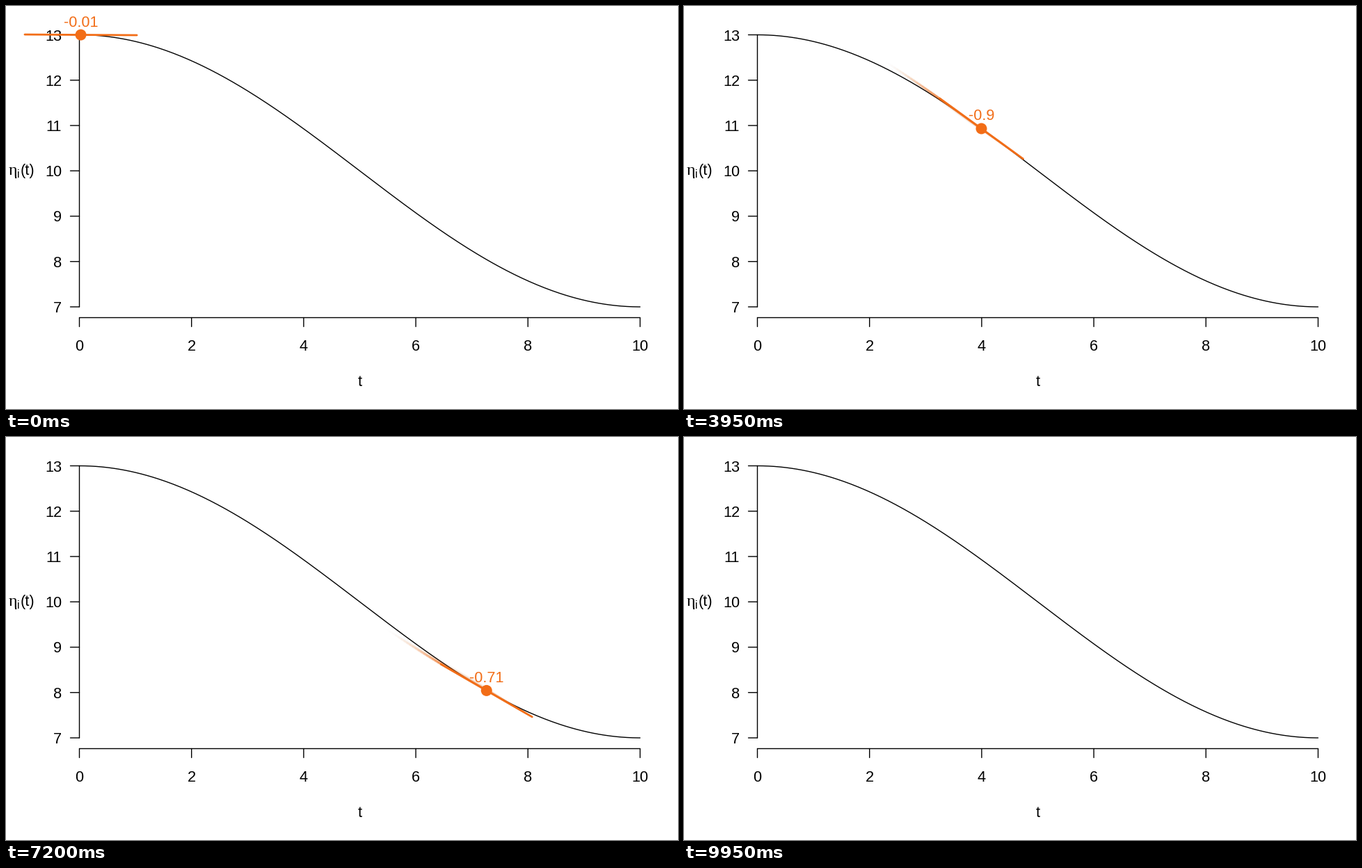
A matplotlib script for the animation above (10000 ms loop, 966x580 px).

```python
import numpy as np
import matplotlib.pyplot as plt
from matplotlib.animation import FuncAnimation
from matplotlib.collections import LineCollection
from matplotlib.colors import to_rgb
from matplotlib.patches import Circle

W, H, DPI = 966, 580, 64
PX = 72 / DPI  # points per pixel
FRAMES, INTERVAL = 200, 50
STEP = 10 / (FRAMES - 1)
WAKE = 20
ORANGE = "#f26d17"
FONT = 21.8

fig = plt.figure(figsize=(W / DPI, H / DPI), dpi=DPI, facecolor="white")
ax = fig.add_axes([0, 0, 1, 1])
ax.set_xlim(0, W)
ax.set_ylim(H, 0)
ax.axis("off")


def sx(t):
    return 105.5 + 80.6 * t


def sy(v):
    return 433 - 65.25 * (v - 7)


def eta(t):
    return 10 + 3 * np.cos(np.pi * t / 10)


def slope(t):
    return -0.3 * np.pi * np.sin(np.pi * t / 10)


def line(x, y):
    ax.plot(x, y, color="black", lw=1.4 * PX, solid_capstyle="round",
            snap=False, zorder=1)


def label(x, y, s, ha="center", size=FONT, font="Liberation Sans", **kw):
    return ax.text(x, y, s, ha=ha, va="baseline", fontsize=size * PX,
                   fontfamily=font, **kw)


def segment(t, m):
    """Segment of slope m and length two (in data units), centred at t."""
    d = np.array([-1, 1]) / np.hypot(1, m)
    return np.column_stack([sx(t + d), sy(eta(t) + m * d)])


# Axes
line([sx(0)] * 2, [sy(7), sy(13)])
for v in range(7, 14):
    line([92.5, sx(0)], [sy(v)] * 2)
    label(80, sy(v) + 8, str(v), ha="right")
line([sx(0), sx(10)], [448.5] * 2)
for t in range(0, 11, 2):
    line([sx(t)] * 2, [448.5, 461.5])
    label(sx(t), 496, str(t))
label(508.5, 547, "t")
label(3.5, 243, "η", ha="left", size=24, font="Liberation Serif")
label(16.3, 247, "i", ha="left", size=15.5)
label(20.3, 243.5, "(t)", ha="left")

ts = np.linspace(0, 10, 300)
line(sx(ts), sy(eta(ts)))

# Moving parts
lines = LineCollection([], linewidths=2.8 * PX, capstyle="round",
                       snap=False, zorder=4)
ax.add_collection(lines, autolim=False)
dot = ax.add_patch(Circle((0, 0), 8, fc=ORANGE, ec="none", zorder=5))
value = label(0, 0, "", color=ORANGE, zorder=6)


def draw(n):
    shown = n < FRAMES - 1
    for part in (lines, dot, value):
        part.set_visible(shown)
    if shown:
        t = (n + 0.5) * STEP
        m = slope(t)
        # The wake keeps past positions but turns with the current slope
        ages = range(min(n, WAKE - 1), -1, -1)
        lines.set_segments([segment(t - k * STEP, m) for k in ages])
        lines.set_color([
            (*to_rgb(ORANGE), 0.16 * (1 - k / WAKE) ** 1.3 if k else 1)
            for k in ages])
        x, y = sx(t), sy(eta(t))
        dot.center = x, y
        value.set_position((x, y - 12))
        value.set_text(f"{round(m, 2):g}")
    return lines, dot, value


anim = FuncAnimation(fig, draw, frames=FRAMES, interval=INTERVAL,
                     repeat=True, repeat_delay=0, blit=False)
plt.show()
```
